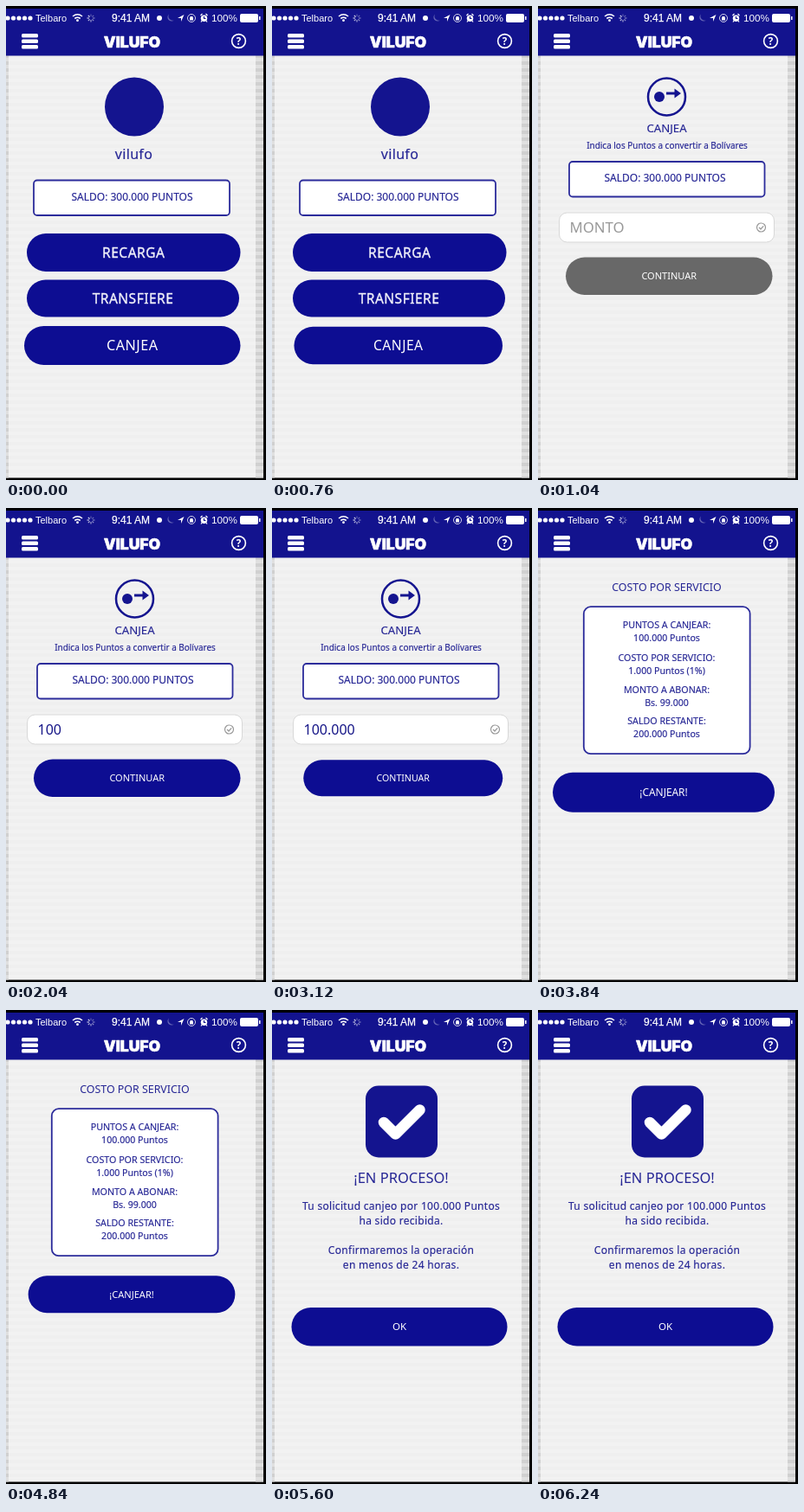
Recreate the animation shown at these times as an HTML page. Size 300 by 548 pixels, loop 6.4 s.

```html
<!DOCTYPE html>
<html lang="es">
<head>
<meta charset="utf-8">
<title>Canje de puntos</title>
<style>
  html, body { margin: 0; width: 100%; height: 100%; overflow: hidden; background: #000; }
  svg { display: block; width: 300px; height: 548px; }
  text { font-family: "Noto Sans", sans-serif; text-anchor: middle; fill: #262695; }
  .medium { stroke: #262695; stroke-width: .15; }
  .spaced { letter-spacing: .3px; stroke: #262695; stroke-width: .15; }
  .button { transform-box: fill-box; transform-origin: center; }
  .button rect { fill: #0d0d92; }
  .button text { fill: #fff; }
  .button .strong { fill: #f2f2fa; stroke: #f2f2fa; stroke-width: .35; letter-spacing: .5px; }
  .box { fill: #fff; stroke: #2c2c9b; stroke-width: 1.8; }
  .status text { font-family: "Liberation Sans", sans-serif; fill: #fff; text-anchor: start; }
  .line { fill: none; stroke: #fff; }
  .field { text-anchor: start; font-weight: 300; }
</style>
</head>
<body>
<svg id="stage" viewBox="0 0 300 548"></svg>
<script>
const LOOP = 6400, STEP = 40;
const NAVY = '#0d0d92', GREY = '#686868';
const KEY_TIMES = [1680, 1880, 2040, 2160, 2320, 2480, 2640];
const AMOUNT = '100.000';

const text = (x, y, size, label, extra = 'class="medium"') =>
  `<text x="${x}" y="${y}" font-size="${size}" ${extra}>${label}</text>`;

const box = (x, y, w, h, r) =>
  `<rect class="box" x="${x}" y="${y}" width="${w}" height="${h}" rx="${r}"/>`;

const button = (id, x, y, w, h, label, size, extra = '') =>
  `<g class="button" id="${id}">
    <rect x="${x}" y="${y}" width="${w}" height="${h}" rx="${h / 2}"/>
    ${text(x + w / 2, y + h / 2 + size * 0.357, size, label, extra)}
  </g>`;

const screen = (id, content) => `<g id="${id}">${content}</g>`;

const stripes = (id, light, dark) => `
  <pattern id="${id}" width="8" height="8" patternUnits="userSpaceOnUse">
    <rect width="8" height="8" fill="${light}"/><rect width="8" height="4" fill="${dark}"/>
  </pattern>`;

const backdrop = `
  <defs>${stripes('paper', '#f2f2f2', '#efefef')}${stripes('edge', '#e0e0e0', '#d0d0d0')}</defs>
  <rect width="297" height="545.5" fill="url(#paper)"/>
  <rect width="3" height="545.5" fill="url(#edge)"/>
  <rect x="288" width="9" height="545.5" fill="url(#edge)"/>
  <rect width="297" height="57.5" fill="#13138e"/>
  <rect width="300" height="3"/>`;

const spokes = Array.from({ length: 8 }, (_, i) =>
  `<path class="line" d="M0 -2V-4.5" opacity="${0.3 + i * 0.08}" transform="translate(98 14) rotate(${i * 45})"/>`).join('');

const statusBar = `<g class="status" stroke-width="1.2">
  ${[2, 8.5, 15, 21.5, 28].map(x => `<circle cx="${x}" cy="14" r="2.6" fill="#fff"/>`).join('')}
  ${text(34, 18, 11, 'Telbaro', '')}
  <path class="line" stroke-width="1.6" d="M77 12Q82.500 7.500 88 12M79.300 14.500Q82.500 12 85.700 14.500"/>
  <circle cx="82.500" cy="16.700" r="1.400" fill="#fff"/>
  ${spokes}
  ${text(122, 18, 12, '9:41 AM', 'stroke="#fff" stroke-width=".25"')}
  <circle cx="177" cy="14" r="3" fill="#fff"/>
  <path d="M188 9.500A4.500 4.500 0 1 0 194 16.500A5 5 0 0 1 188 9.500" fill="#6565b5"/>
  <path d="M205.500 10L202 18V14H198Z" fill="#fff"/>
  <circle class="line" cx="214" cy="14" r="4.500" stroke-width=".8"/>
  <path d="M212 13.500h4v3h-4zM212.500 13.500v-1.500h3v1.500" fill="#fff"/>
  <circle cx="228.500" cy="14.300" r="3.700" fill="#fff"/>
  <path class="line" d="M224.500 11L226.500 9M232.500 11L230.500 9M226 17L225 18.500M231 17L232 18.500"/>
  <path d="M228.500 12v2.500h2" fill="none" stroke="#13138e"/>
  ${text(237, 18, 11.7, '100%', '')}
  <rect x="270" y="9" width="21" height="10" rx="2" fill="#fff"/>
  <rect x="292" y="12" width="1.500" height="4" fill="#fff"/>
</g>`;

const navBar = `
  ${[32, 38.5, 45].map(y => `<rect x="18" y="${y}" width="19" height="4.600" rx="1.500" fill="#fff"/>`).join('')}
  ${text(145.5, 48, 17.5, 'VILUFO', 'style="font:900 17.5px Inter,sans-serif;fill:#fff" stroke="#fff" stroke-width=".6" stroke-linejoin="round"')}
  <circle class="line" cx="268.500" cy="40.500" r="7.900" stroke-width="1.600"/>
  ${text(268.5, 44.7, 11.5, '?', 'style="fill:#fff;font-weight:700"')}`;

const home = screen('home', `
  <circle cx="148" cy="116.500" r="34" fill="#14148f"/>
  ${text(147.5, 177, 16, 'vilufo', 'class="spaced"')}
  ${box(32, 201.5, 226, 40.5, 4)}
  ${text(145.5, 224.6, 12, 'SALDO: 300.000 PUNTOS')}
  ${button('topUp', 24, 263, 246.5, 44, 'RECARGA', 15.5, 'class="strong"')}
  ${button('transfer', 24, 316.5, 245, 43, 'TRANSFIERE', 15.5, 'class="strong"')}
  ${button('redeem', 21, 370, 249.5, 45, 'CANJEA', 16.2, 'letter-spacing=".5"')}`);

const form = screen('form', `
  <circle cx="148.500" cy="105" r="21.500" fill="none" stroke="#14148f" stroke-width="2.500"/>
  <circle cx="140" cy="105" r="6" fill="#14148f"/>
  <path d="M148 99.500h9.500v-4l7.500 5.500l-7.500 5.500v-4h-9.500z" fill="#14148f"/>
  ${text(148.5, 146.3, 13.2, 'CANJEA')}
  ${text(149, 165, 9.95, 'Indica los Puntos a convertir a Bolívares')}
  ${box(36, 180, 225.5, 40.5, 4)}
  ${text(146.5, 203.3, 12, 'SALDO: 300.000 PUNTOS')}
  <rect x="24.500" y="239" width="248" height="34" rx="9" fill="#fff" stroke="#d8d8d8"/>
  <text id="amount" class="field" x="36.500" y="262"></text>
  <g fill="none" stroke="#999" stroke-width="1.200">
    <circle cx="257.500" cy="256" r="5"/><path d="M255 256l2 2l3.200-3.700"/>
  </g>
  ${button('next', 32, 290.5, 238.5, 43.5, 'CONTINUAR', 11)}`);

const costs = [
  ['PUNTOS A CANJEAR:', '100.000 Puntos', 139.3],
  ['COSTO POR SERVICIO:', '1.000 Puntos (1%)', 177],
  ['MONTO A ABONAR:', 'Bs. 99.000', 214],
  ['SALDO RESTANTE:', '200.000 Puntos', 250.3],
];

const summary = screen('summary', `
  ${text(148.5, 96, 12.4, 'COSTO POR SERVICIO', '')}
  ${box(52.8, 114.2, 191.8, 170, 8)}
  ${costs.map(([label, value, y]) => text(148.5, y, 10.7, label) + text(148.5, y + 15, 10.6, value)).join('')}
  ${button('confirm', 17, 305.7, 256, 46, '¡CANJEAR!', 11.9)}`);

const done = screen('done', `
  <rect x="108" y="87.500" width="83" height="83" rx="15" fill="#14148f"/>
  <path d="M129 130L142.500 143.500L170.500 115.500" fill="none" stroke="#fff" stroke-width="12.500" stroke-linecap="round" stroke-linejoin="round"/>
  ${text(149, 200, 16.5, '¡EN PROCESO!', '')}
  ${text(149, 231, 12, 'Tu solicitud canjeo por 100.000 Puntos', 'class="spaced"')}
  ${text(149, 248, 12, 'ha sido recibida.', 'class="spaced"')}
  ${text(149, 282, 12, 'Confirmaremos la operación', 'class="spaced"')}
  ${text(149, 299, 12, 'en menos de 24 horas.', 'class="spaced"')}
  ${button('ok', 22.5, 344, 249, 44.5, 'OK', 11.5)}`);

document.getElementById('stage').innerHTML =
  backdrop + statusBar + navBar + home + form + summary + done;

const $ = id => document.getElementById(id);
const ramp = (t, from, to) => Math.min(1, Math.max(0, (t - from) / (to - from)));

// Shrink by a tenth and spring back over 360 ms.
const press = (t, start) => 1 - 0.105 * Math.sin(Math.PI * ramp(t, start - STEP, start + 320));
const setScale = (id, value) => { $(id).style.transform = `scale(${value})`; };

function showScreens(t) {
  const entered = [1, ramp(t, 880, 1040), ramp(t, 3600, 3840), ramp(t, 5120, 5320), 0];
  ['home', 'form', 'summary', 'done'].forEach((id, i) => {
    const opacity = entered[i] * (1 - entered[i + 1]);
    $(id).style.opacity = opacity;
    $(id).style.display = opacity ? '' : 'none';
  });
}

function showForm(t) {
  const typed = KEY_TIMES.filter(time => t >= time).length;
  const amount = $('amount');
  amount.textContent = typed ? AMOUNT.slice(0, typed) : 'MONTO';
  amount.style.fill = typed ? '#171788' : '#999';
  amount.style.fontSize = typed ? '16px' : '16.8px';
  const active = 100 * ramp(t, 1640, 1720);
  $('next').firstElementChild.style.fill = `color-mix(in srgb, ${NAVY} ${active}%, ${GREY})`;
}

function render(now) {
  const t = Math.floor((now % LOOP) / STEP) * STEP;
  showScreens(t);
  showForm(t);
  setScale('redeem', press(t, 480));
  setScale('next', press(t, 3120));
  setScale('confirm', press(t, 4600));
  setScale('ok', t < 5600 ? 1.008 : press(t, 5920));
}

const start = performance.now();
function tick() {
  render(performance.now() - start);
  requestAnimationFrame(tick);
}
tick();
</script>
</body>
</html>
```
